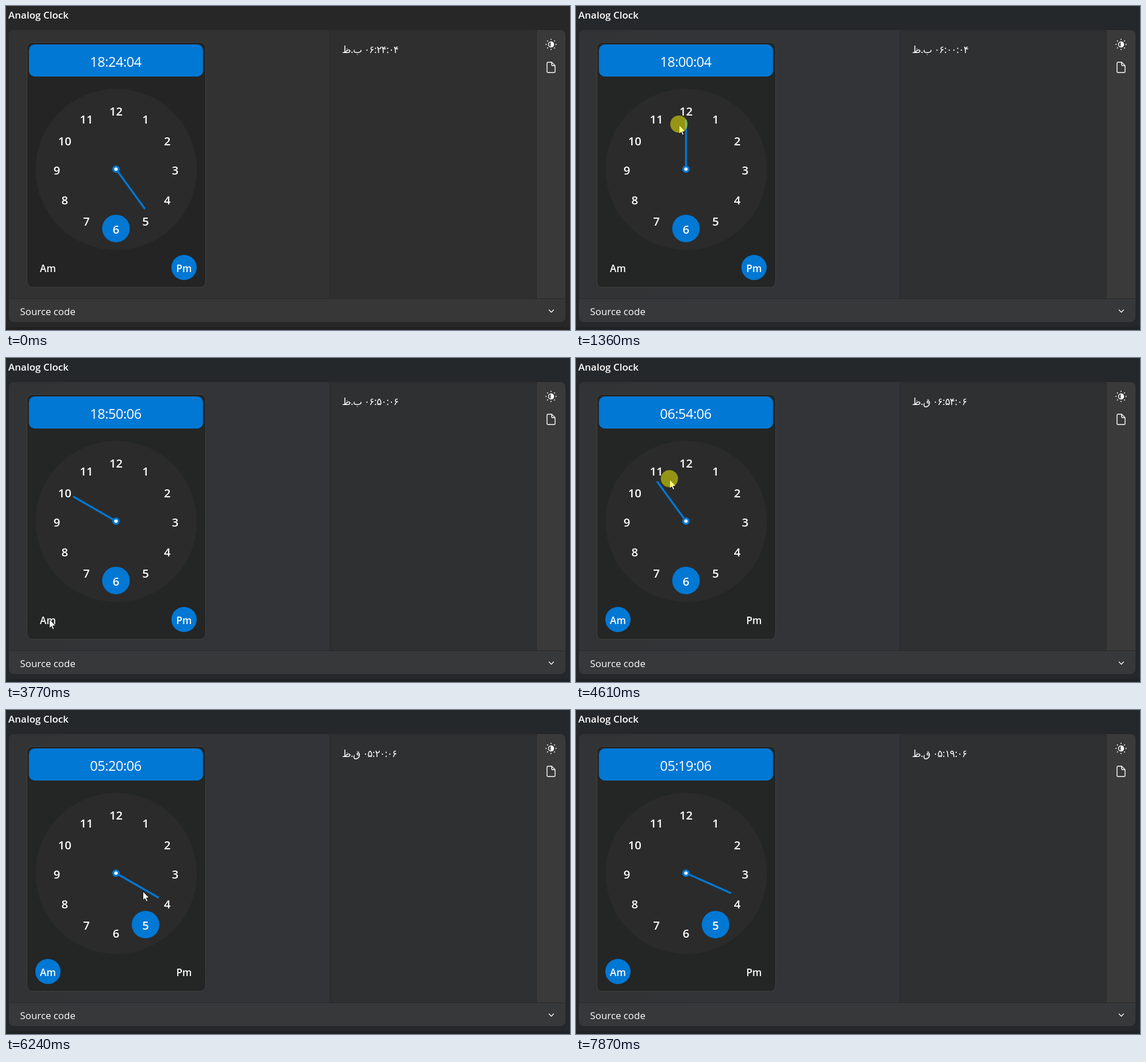
Recreate the animation shown at these times as an HTML page. Size 982x565 px, loop 8.34 s.

```html
<!DOCTYPE html>
<html lang="en">
<head>
<meta charset="utf-8">
<title>Analog Clock</title>
<style>
  html, body { margin: 0; width: 100%; height: 100%; overflow: hidden; background: #272727; }
  svg { display: block; width: 982px; height: 565px; overflow: hidden;
    --page: #272727; --a: #323232; --b: #323232; --code: #2f2f2f; --rail: #393939;
    --strip: #373737; --card: #242424; --face: #2b2b2b; --foot: #212121; }
  svg.cool { --page: #24282b; --a: #323334; --b: #323438; --code: #2f3031; --rail: #3a3a3b;
    --strip: #36383a; --card: #242525; --foot: #1f2326; }
  text { fill: #fff; font-family: "Open Sans", "Noto Sans", sans-serif; }
  .bold { font-weight: 600; }
  .mid { text-anchor: middle; }
  .time { font-size: 23.6px; letter-spacing: -.5px; }
  .fa { font: 17px "DejaVu Sans", sans-serif; letter-spacing: -.9px; direction: rtl; text-anchor: end; }
  .blue { fill: #0078d4; }
  .icon { fill: none; stroke: #fff; stroke-width: 1.4; stroke-linecap: round; stroke-linejoin: round; }
</style>
</head>
<body>
<svg id="stage" viewBox="0 0 982 565">
  <defs>
    <linearGradient id="main">
      <stop offset="0" stop-color="var(--a)"/>
      <stop offset=".65" stop-color="var(--b)"/>
    </linearGradient>
    <clipPath id="round"><rect x="5" y="42" width="969" height="509" rx="8"/></clipPath>
  </defs>
  <rect width="982" height="565" fill="var(--page)"/>
  <rect y="560" width="982" height="5" fill="var(--foot)"/>
  <text class="bold" x="4" y="22" font-size="17">Analog Clock</text>

  <g clip-path="url(#round)">
    <rect x="5" y="42" width="559" height="469" fill="url(#main)"/>
    <rect x="564" y="42" width="360" height="469" fill="var(--code)"/>
    <rect x="924" y="42" width="50" height="469" fill="var(--rail)"/>
    <rect x="5" y="511" width="969" height="40" fill="var(--strip)"/>
    <path d="M564.5 42V511M923.5 42V511M5 510.5H974" stroke="#282828" fill="none"/>
  </g>
  <text x="24.5" y="539" font-size="16.9">Source code</text>
  <path class="icon" d="M945.5 530l4 4 4-4"/>
  <g class="icon" transform="translate(949 67)">
    <circle r="4.5"/>
    <path d="M0 -4.5A4.5 4.5 0 0 1 0 4.5Z" fill="#fff"/>
    <g id="rays"></g>
  </g>
  <path class="icon" d="M950 98h-6a2 2 0 0 0-2 2v14a2 2 0 0 0 2 2h10a2 2 0 0 0 2-2v-10zv4a2 2 0 0 0 2 2h4"/>
  <text id="persian" class="fa" x="585" y="82"></text>

  <rect x="36.5" y="63.5" width="311" height="427" rx="9" fill="var(--card)" stroke="#414141"/>
  <rect class="blue" x="40" y="67" width="303" height="56" rx="10"/>
  <text id="digital" class="mid time" x="191" y="106"></text>
  <circle cx="192" cy="285" r="140.5" fill="var(--face)"/>
  <circle id="spot" class="blue" r="24"/>
  <path id="hand" d="M0 0V-86" stroke="#0078d4" stroke-width="3.4"/>
  <circle class="blue" cx="191.5" cy="284.5" r="6.5"/>
  <circle cx="191.5" cy="284.5" r="3" fill="#fff"/>
  <g id="numbers" class="bold mid" font-size="20.3"></g>
  <circle id="half" class="blue" cy="456" r="22"/>
  <g class="bold mid" font-size="17.2">
    <text x="73" y="464">Am</text>
    <text x="310" y="464">Pm</text>
  </g>

  <g id="cursor">
    <path d="M.5 .5V16.2L4 13 6.4 18.4 8.9 17.3 6.5 12H11.4Z" fill="#fff" stroke="#111"/>
    <circle id="press" cy="-1" r="15" fill="#ff0" fill-opacity=".5"/>
  </g>
</svg>
<script>
  const LOOP = 8340, START = 190, STEP = 69.2, LAST = 111;
  const $ = id => document.getElementById(id);
  const set = (id, name, value) => $(id).setAttribute(name, value);

  function add(parent, tag, attrs, text = "") {
    const el = document.createElementNS("http://www.w3.org/2000/svg", tag);
    for (const key in attrs) el.setAttribute(key, attrs[key]);
    el.textContent = text;
    $(parent).append(el);
  }

  // A point around the clock's centre, at a fraction of a full turn.
  function polar(turn, r) {
    const a = turn * 2 * Math.PI;
    return [191.5 + r * Math.sin(a), 285 - r * Math.cos(a)];
  }
  const hourSpot = hour => polar(hour / 12, 103);

  for (let h = 1; h <= 12; h++) {
    const [x, y] = hourSpot(h);
    add("numbers", "text", { x, y: y + 9 }, h);
  }
  for (let i = 0; i < 8; i++)
    add("rays", "path", { d: "M0 -8.2V-9.2", transform: `rotate(${i * 45})` });

  const ramp = (k, from, to) => Math.min(1, Math.max(0, (k - from) / (to - from)));
  const mix = (p, q, u) => p.map((v, i) => v + (q[i] - v) * u);

  // Two drags of the hand, then the wheel forth and back.
  const minuteAt = k =>
    24 - 34 * ramp(k, 7, 21) + 30 * ramp(k, 63, 70) + 8 * ramp(k, 88, 95) - 9 * ramp(k, 97, 103);

  // While dragging, the pointer runs half a step ahead of the hand.
  function cursorAt(k) {
    const grip = polar(minuteAt(k + 0.5) / 60, 79);
    const trips = [
      [0, 4, grip], [23, 31, [227, 90]], [37, 44, [142, 386]], [44, 52, [75, 455]],
      [55, 62, grip], [75, 78, [243, 369]], [82, 88, [237, 305]], [105, LAST, [609, 565]]
    ];
    return trips.reduce((pos, [from, to, goal]) => mix(pos, goal, ramp(k, from, to)), [376, 443]);
  }

  const within = (k, from, to) => k >= from && k < to;
  const pressed = k => within(k, 4, 23) || within(k, 53, 55) || within(k, 63, 71) || within(k, 79, 81);

  const two = n => String(n).padStart(2, "0");
  const toPersian = s => s.replace(/\d/g, d => String.fromCharCode(0x6f0 + +d));

  function draw(t) {
    const k = Math.min(LAST, Math.floor((t - START) / STEP + 0.4));
    const shown = t >= START && k < LAST;
    const pm = k < 55;
    const hour = k < 71 ? 6 : k < 81 ? 4 : 5;
    const minute = (Math.round(minuteAt(k)) + 60) % 60;
    const second = k < 34 ? 4 : k < 36 ? 5 : 6;
    const rest = `:${two(minute)}:${two(second)}`;

    set("stage", "class", k >= 7 ? "cool" : "");
    $("digital").textContent = two(pm ? hour + 12 : hour) + rest;
    $("persian").textContent = toPersian(two(hour) + rest) + (pm ? " ب.ظ" : " ق.ظ");
    set("hand", "transform", `translate(191.5 284.5) rotate(${minute * 6})`);
    set("spot", "transform", `translate(${hourSpot(hour)})`);
    set("half", "cx", pm ? 310 : 73);
    set("cursor", "display", shown ? "inline" : "none");
    set("cursor", "transform", `translate(${cursorAt(k)})`);
    set("press", "display", pressed(k) ? "inline" : "none");
  }

  const begin = performance.now();
  function tick() {
    draw((performance.now() - begin) % LOOP);
    requestAnimationFrame(tick);
  }
  tick();
</script>
</body>
</html>
```
